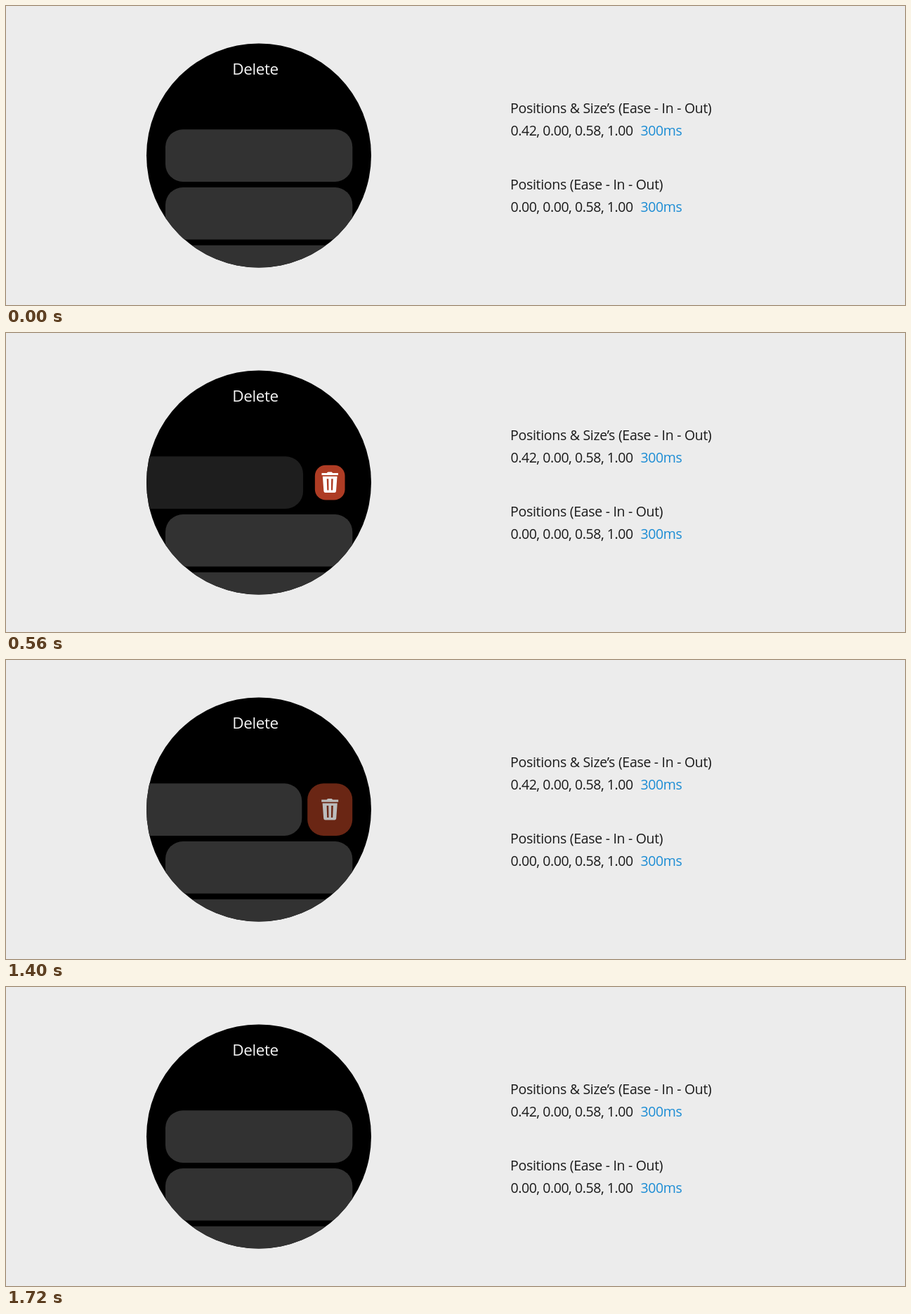
Animation, 1280 px wide and 427 px high, one loop 3040 ms. Source, as an HTML page:

```html
<!DOCTYPE html>
<html lang="en">
<head>
<meta charset="utf-8">
<title>Swipe to delete</title>
<style>
  html, body { margin: 0; width: 100%; height: 100%; overflow: hidden; background: #ececec; }
  svg { display: block; width: 100%; height: 100%; }
  text { font-family: "Open Sans", "Noto Sans", sans-serif; font-size: 19.5px; fill: #1a1a1a; letter-spacing: -.3px; }
  .num { letter-spacing: -.45px; }
  .blue { fill: #1b8cd4; letter-spacing: -.4px; }
  .title { font-size: 22.5px; fill: #f4f4f4; letter-spacing: -.4px; }
</style>
</head>
<body>
<svg viewBox="0 0 1280 427">
  <defs>
    <clipPath id="face"><circle cx="360" cy="213.5" r="160"/></clipPath>
    <rect id="card" x="227" y="176.3" width="266.3" height="74.6" rx="25"/>
  </defs>
  <circle cx="360" cy="213.5" r="160"/>
  <g clip-path="url(#face)">
    <g id="button">
      <rect id="plate" x="-32" y="-37.3" width="64" height="74.6" rx="23"/>
      <g id="icon">
        <path d="M-12-14h7.5q.5-1.6 2-1.6h5q1.500 1.600 2 1.600H12v3.200H-12z"/>
        <path fill-rule="evenodd" d="M-10.600-9H10.600L9 12.600Q8.800 14.800 6.600 14.800H-6.600Q-8.800 14.800-9 12.600zM-4.600-5.500L-4 11.300H-1.700L-2-5.500zM4.600-5.500L4 11.300H1.700L2-5.500z"/>
      </g>
    </g>
    <use id="first" href="#card"/>
    <g id="rest" fill="#323232">
      <use href="#card" y="82.7"/>
      <use href="#card" y="165.4"/>
      <use href="#card" y="248.1"/>
    </g>
  </g>
  <text class="title" x="322.3" y="97.500">Delete</text>
  <text x="718" y="153">Positions &amp; Size’s (Ease - In - Out)</text>
  <text class="num" x="718.500" y="185">0.42, 0.00, 0.58, 1.00</text>
  <text class="blue" x="903.500" y="185">300ms</text>
  <text x="718" y="262">Positions (Ease - In - Out)</text>
  <text class="num" x="718.500" y="294">0.00, 0.00, 0.58, 1.00</text>
  <text class="blue" x="903.500" y="294">300ms</text>
</svg>
<script>
const LOOP = 3040, STEP = 40, PITCH = 82.7, SWIPE = 72;
const $ = id => document.getElementById(id);
const [button, plate, icon, first, rest] = ['button', 'plate', 'icon', 'first', 'rest'].map($);

// CSS-style cubic curve with y handles at 0 and 1
function curve(x1, x2) {
  return x => {
    let lo = 0, hi = 1;
    for (let i = 0; i < 24; i++) {
      const u = (lo + hi) / 2, v = 1 - u;
      if (3 * v * v * u * x1 + 3 * v * u * u * x2 + u * u * u < x) lo = u; else hi = u;
    }
    return lo * lo * (3 - 2 * lo);
  };
}
const easeInOut = curve(.42, .58), easeOut = curve(0, .58);

function span(t, from, to, ease) {
  const p = (t - from) / (to - from);
  return p <= 0 ? 0 : p >= 1 ? 1 : ease(p);
}

function draw(t) {
  const slide = span(t, 400, 580, easeInOut);
  const grow = span(t, 410, 720, easeOut);
  const rise = span(t, 1400, 1624, easeOut);
  const pressed = t >= 280 && t < 840;
  const dimmed = t >= 1400;

  first.setAttribute('transform', `translate(${-SWIPE * slide} 0)`);
  first.setAttribute('fill', pressed ? '#1e1e1e' : '#323232');
  first.setAttribute('opacity', 1 - span(t, 1400, 1720, easeInOut));

  button.setAttribute('transform', 'translate(461.2 213.6)');
  button.setAttribute('opacity', t < 440 ? 0 : 1 - span(t, 1400, 1720, easeOut));
  plate.setAttribute('transform', `scale(${grow})`);
  plate.setAttribute('fill', dimmed ? '#6a2614' : '#ae3c24');
  icon.setAttribute('transform', `scale(${slide})`);
  icon.setAttribute('fill', dimmed ? '#bcbcbc' : '#fff');

  rest.setAttribute('transform', `translate(0 ${-PITCH * rise})`);
}

const start = performance.now();
function tick() {
  const t = (performance.now() - start) % LOOP;
  draw(Math.floor(t / STEP) * STEP);
  requestAnimationFrame(tick);
}
draw(0);
requestAnimationFrame(tick);
</script>
</body>
</html>
```
